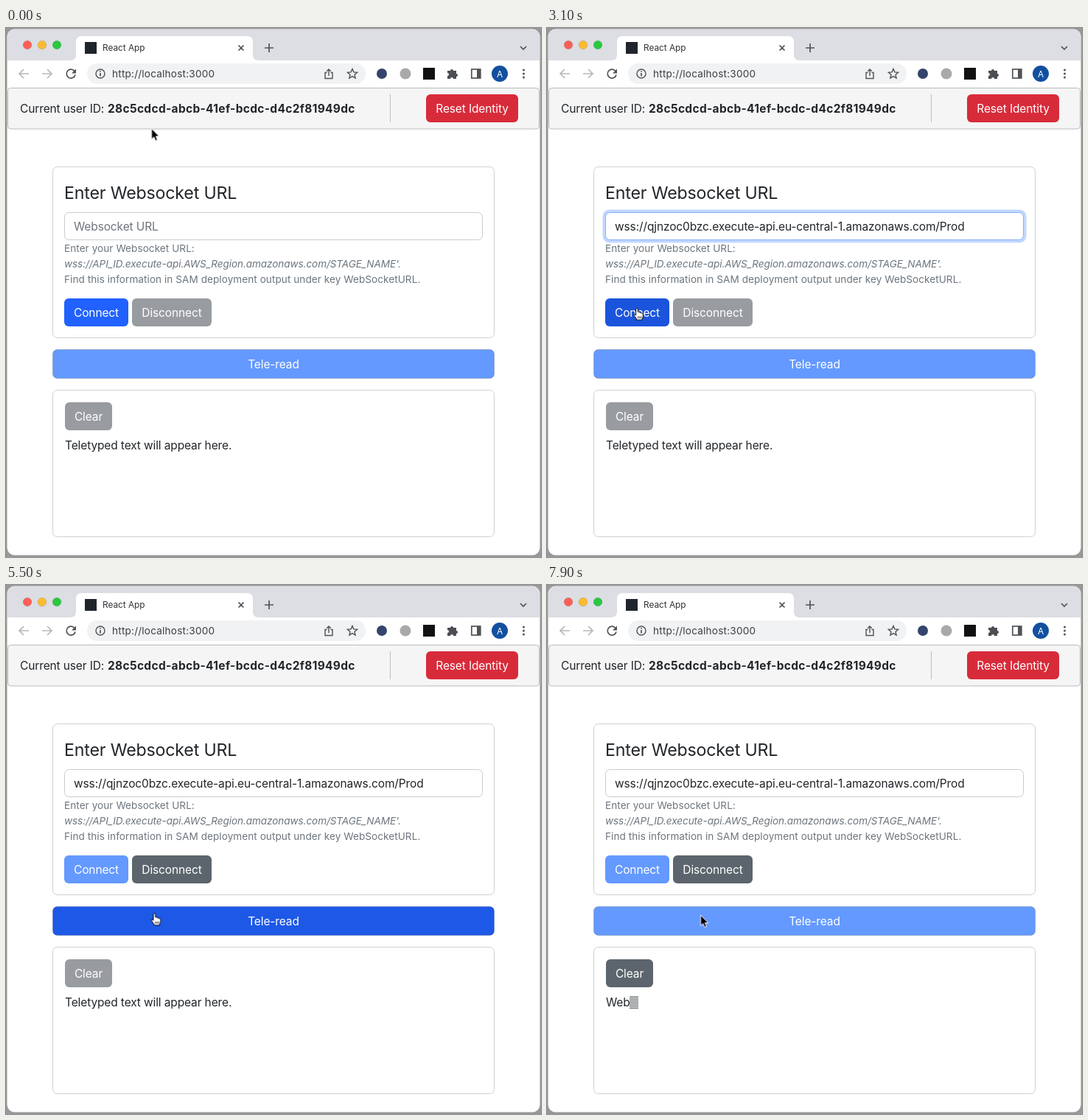
Recreate the animation shown at these times as an HTML page. Size 726 px wide and 718 px high, loop 8000 ms.

```html
<!DOCTYPE html>
<html lang="en">
<head>
<meta charset="utf-8">
<title>React App</title>
<style>
html, body { margin: 0; width: 100%; height: 100%; overflow: hidden; background: #98989a; }
svg { display: block; width: 726px; height: 718px; }
text { font: 15.5px Inter, Roboto, "Open Sans", sans-serif; letter-spacing: -.008em; fill: #212529; white-space: pre; }
.title { font-size: 23.2px; }
.bold { font-weight: 700; letter-spacing: .021em; }
.help { font-size: 13.55px; letter-spacing: .005em; fill: #6c757d; }
.path { font-style: italic; letter-spacing: -.005em; }
.tab { font-size: 11.8px; letter-spacing: 0; fill: #303236; }
.address { font-size: 13.55px; letter-spacing: .016em; fill: #3c3f43; }
.hint { fill: #6c757d; }
.button text { fill: #fff; text-anchor: middle; }
.card { fill: #fff; stroke: #cfd0d1; }
.line { fill: none; stroke: #505357; stroke-width: 1.7; }
.thin { stroke-width: 1.4; }
.faint { stroke: #b5b8bc; }

/* One loop is 8 s, so 1.25% is 100 ms */
.play { animation: 8s linear infinite; }
.hard { animation: 8s step-end infinite; }
.cursor { animation-name: move; }
.arrow { animation-name: arrow; }
.beam { animation-name: beam; }
.hand { animation-name: hand; }
.ring { animation-name: ring; }
.edge { animation-name: edge; }
.hint { animation-name: hint; }
.value { animation-name: value; }
.connect { animation-name: connect; }
.disconnect { animation-name: disconnect; }
.read { animation-name: read; }
.clear { animation-name: clear; }
.idle { animation-name: idle; }
.one { animation-name: one; }
.two { animation-name: two; }
.three { animation-name: three; }

@keyframes move {
  0%, 1.25% { transform: translate(197.5px, 136.5px); animation-timing-function: ease-in-out; }
  8.75%, 23.75% { transform: translate(87px, 276px); }
  32.5% { transform: translate(118px, 366px); }
  33.75%, 35% { transform: translate(122.5px, 377px); animation-timing-function: ease-in-out; }
  43.75%, 52.5% { transform: translate(121.5px, 385.5px); }
  55%, 62.5% { transform: translate(79px, 405px); animation-timing-function: ease-in-out; }
  70%, 100% { transform: translate(208.5px, 448px); }
}
@keyframes arrow {
  0%, 25%, 52.5%, 77.5% { opacity: 1; }
  6.25%, 32.5%, 67.5% { opacity: 0; }
}
@keyframes beam {
  0%, 25% { opacity: 0; }
  6.25% { opacity: 1; }
}
@keyframes hand {
  0%, 52.5%, 77.5% { opacity: 0; }
  32.5%, 67.5% { opacity: 1; }
}
@keyframes ring {
  0%, 12.5% { opacity: 0; }
  14.375%, 46.25% { opacity: 1; }
  48.125%, 100% { opacity: 0; }
}
@keyframes edge {
  0%, 12.5% { stroke: #c8cbce; }
  14.375%, 46.25% { stroke: #86b0fa; }
  48.125%, 100% { stroke: #c8cbce; }
}
@keyframes hint { 0% { opacity: 1; } 15%, 100% { opacity: 0; } }
@keyframes value { 0% { opacity: 0; } 15%, 100% { opacity: 1; } }
@keyframes connect {
  0%, 32.5% { fill: #2061ff; }
  34.375%, 46.25% { fill: #1b54dc; }
  47.5%, 52.49% { fill: #1a4fd0; }
  52.5% { fill: #6b8fe6; }
  54.375%, 100% { fill: #6499ff; }
}
@keyframes disconnect { 0% { fill: #989ca0; } 52.5%, 100% { fill: #5c656d; } }
@keyframes read {
  0%, 52.49% { fill: #6499ff; }
  52.5%, 67.5% { fill: #2061ff; }
  69.375%, 77.49% { fill: #1b54dc; }
  77.5% { fill: #668fe2; }
  78.75% { fill: #6291e7; }
  80.625%, 100% { fill: #6499ff; }
}
@keyframes clear { 0% { fill: #989ca0; } 96.25%, 100% { fill: #5c656d; } }
@keyframes idle { 0% { opacity: 1; } 96.25%, 100% { opacity: 0; } }
@keyframes one { 0%, 97.5% { opacity: 0; } 96.25% { opacity: 1; } }
@keyframes two { 0%, 98.75% { opacity: 0; } 97.5% { opacity: 1; } }
@keyframes three { 0% { opacity: 0; } 98.75%, 100% { opacity: 1; } }
</style>
</head>
<body>
<svg viewBox="0 0 726 718">
  <defs>
    <pattern id="shade" width="2" height="2" patternUnits="userSpaceOnUse">
      <rect width="2" height="1" fill="#777b7e"/>
      <rect y="1" width="2" height="1" fill="#e4e5e6"/>
    </pattern>
    <rect id="block" y="558" width="12" height="18" fill="url(#shade)"/>
  </defs>

  <!-- Window and tab strip -->
  <rect width="726" height="718" fill="#98989a"/>
  <rect x="1.5" y="1.5" width="723" height="714" rx="10" fill="#fff"/>
  <path d="M2 44V12Q2 2 12 2H714Q724 2 724 12V44Z" fill="#dcdee3"/>
  <path d="M87 44Q95 44 95 36V19Q95 11 103 11H327Q335 11 335 19V36Q335 44 343 44Z" fill="#fff"/>
  <g stroke-opacity=".12" stroke="#000">
    <circle cx="29" cy="23" r="5.8" fill="#fe5f57"/>
    <circle cx="49" cy="23" r="5.8" fill="#febb2e"/>
    <circle cx="69" cy="23" r="5.8" fill="#28c840"/>
  </g>
  <rect x="107" y="19" width="16" height="16" fill="#20242b"/>
  <text class="tab" x="131" y="31">React App</text>
  <path class="line" d="M315.5 23.5l7 7m0-7l-7 7M351 27h12m-6-6v12M698 25l4 4 4-4"/>

  <!-- Toolbar -->
  <path class="line faint" d="M31 62H18m6-6l-6 6 6 6M49 62H62m-6-6l6 6-6 6"/>
  <path class="line" d="M93 58.5A6 6 0 1 0 94 63.5"/>
  <path d="M95 55.5V61.5H89Z" fill="#505357"/>
  <rect x="110" y="48" width="378" height="28" rx="14" fill="#f0f2f4"/>
  <circle class="line thin" cx="128" cy="62" r="6"/>
  <path class="line" d="M128 61v4.5M128 58v1.6"/>
  <text class="address" x="144" y="67">http://localhost:3000</text>
  <path class="line thin" d="M435.5 60.5H433V68.5H443V60.5H440.5M438 65V56m-2.8 2.8L438 56l2.8 2.8"/>
  <path class="line thin" d="M470 55.5l1.9 4.4 4.7.4-3.6 3.1 1.1 4.7-4.1-2.5-4.1 2.5 1.1-4.7-3.6-3.1 4.7-.4Z"/>
  <circle cx="510" cy="62" r="7" fill="#35446b"/>
  <circle cx="542" cy="62" r="7.5" fill="#a8a9ab"/>
  <rect x="566" y="54" width="16" height="16" fill="#111"/>
  <path d="M599 58h4a2 2 0 1 1 4 0h4v4a2 2 0 1 1 0 4v3h-4a2 2 0 1 0-4 0h-4v-4a2 2 0 1 0 0-4Z" fill="#4b4e52"/>
  <rect class="line" x="631.8" y="56" width="12" height="12"/>
  <path d="M639 56h5v12h-5Z" fill="#505357"/>
  <circle cx="670" cy="62" r="11" fill="#12509f"/>
  <text class="tab" x="670" y="66.5" text-anchor="middle" style="fill:#fff">A</text>
  <g fill="#505357">
    <circle cx="702.5" cy="57" r="1.5"/>
    <circle cx="702.5" cy="62" r="1.5"/>
    <circle cx="702.5" cy="67" r="1.5"/>
  </g>

  <!-- Identity bar -->
  <rect x="2.5" y="81.5" width="721" height="55.5" rx="4" fill="#f5f5f5" stroke="#b9babb"/>
  <text x="19" y="115">Current user ID:</text>
  <text class="bold" x="138" y="115">28c5cdcd-abcb-41ef-bcdc-d4c2f81949dc</text>
  <path d="M521.5 90V128" stroke="#bcbdbe"/>
  <g class="button">
    <rect x="570" y="90" width="125" height="38" rx="6" fill="#d82b3a"/>
    <text x="632.5" y="115">Reset Identity</text>
  </g>

  <!-- Connection card -->
  <rect class="card" x="63.5" y="188.5" width="599" height="232" rx="6"/>
  <text class="title" x="79" y="232">Enter Websocket URL</text>
  <rect class="ring play" x="75.5" y="246.5" width="575" height="45" rx="9" fill="#c1d7ff"/>
  <rect class="edge play" x="79.5" y="250.5" width="567" height="37" rx="6" fill="#fff"/>
  <text class="hint hard" x="92" y="275">Websocket URL</text>
  <text class="value hard" x="92" y="275">wss://qjnzoc0bzc.execute-api.eu-central-1.amazonaws.com/Prod</text>
  <text class="help" x="79" y="304">Enter your Websocket URL:</text>
  <text class="help path" x="79" y="325">wss://API_ID.execute-api.AWS_Region.amazonaws.com/STAGE_NAME'.</text>
  <text class="help" x="79" y="346">Find this information in SAM deployment output under key WebSocketURL.</text>
  <g class="button">
    <rect class="connect play" x="79" y="367" width="87" height="38" rx="6"/>
    <text x="122.5" y="392">Connect</text>
    <rect class="disconnect hard" x="171" y="367" width="108" height="38" rx="6"/>
    <text x="225" y="392">Disconnect</text>
    <rect class="read play" x="63.5" y="436.5" width="599" height="39" rx="6" stroke="#000" stroke-opacity=".175"/>
    <text x="363" y="462">Tele-read</text>
  </g>

  <!-- Output card -->
  <rect class="card" x="63.5" y="491.5" width="599" height="199" rx="6"/>
  <g class="button">
    <rect class="clear hard" x="80" y="508" width="64" height="38" rx="6"/>
    <text x="112" y="533">Clear</text>
  </g>
  <text class="idle hard" x="80" y="572">Teletyped text will appear here.</text>
  <g class="one hard"><text x="80" y="572">W</text><use href="#block" x="95"/></g>
  <g class="two hard"><text x="80" y="572">We</text><use href="#block" x="104"/></g>
  <g class="three hard"><text x="80" y="572">Web</text><use href="#block" x="112"/></g>

  <g class="cursor play">
    <path class="arrow hard" d="M0 0V14.5L3.3 11.5 5.4 16.5 8 15.4 5.9 10.6H10.3Z" fill="#000" stroke="#fff"/>
    <path class="beam hard" d="M-3-7.5Q0-7.5 0-5.5Q0-7.5 3-7.5M0-6V6M-3 7.5Q0 7.5 0 5.5Q0 7.5 3 7.5M-1.8 2.5H1.8" fill="none" stroke="#111" stroke-width="1.3"/>
    <g class="hand hard" stroke="#000" stroke-linejoin="round">
      <path d="M-1.5 1.2Q-1.5 0-.2 0Q1.2 0 1.2 1.2V5Q3.5 4.5 4 6Q6 5.5 6.4 7Q8.2 6.8 8.3 8.5V11Q8 13 7 14.5V16H-.5V14.8L-4 9.8Q-4.6 8-3 8L-1.5 9.5Z" fill="#fff"/>
      <path d="M1.5 11V14M3.5 11V14M5.5 11V14" stroke-width=".8"/>
    </g>
  </g>
</svg>
</body>
</html>
```
